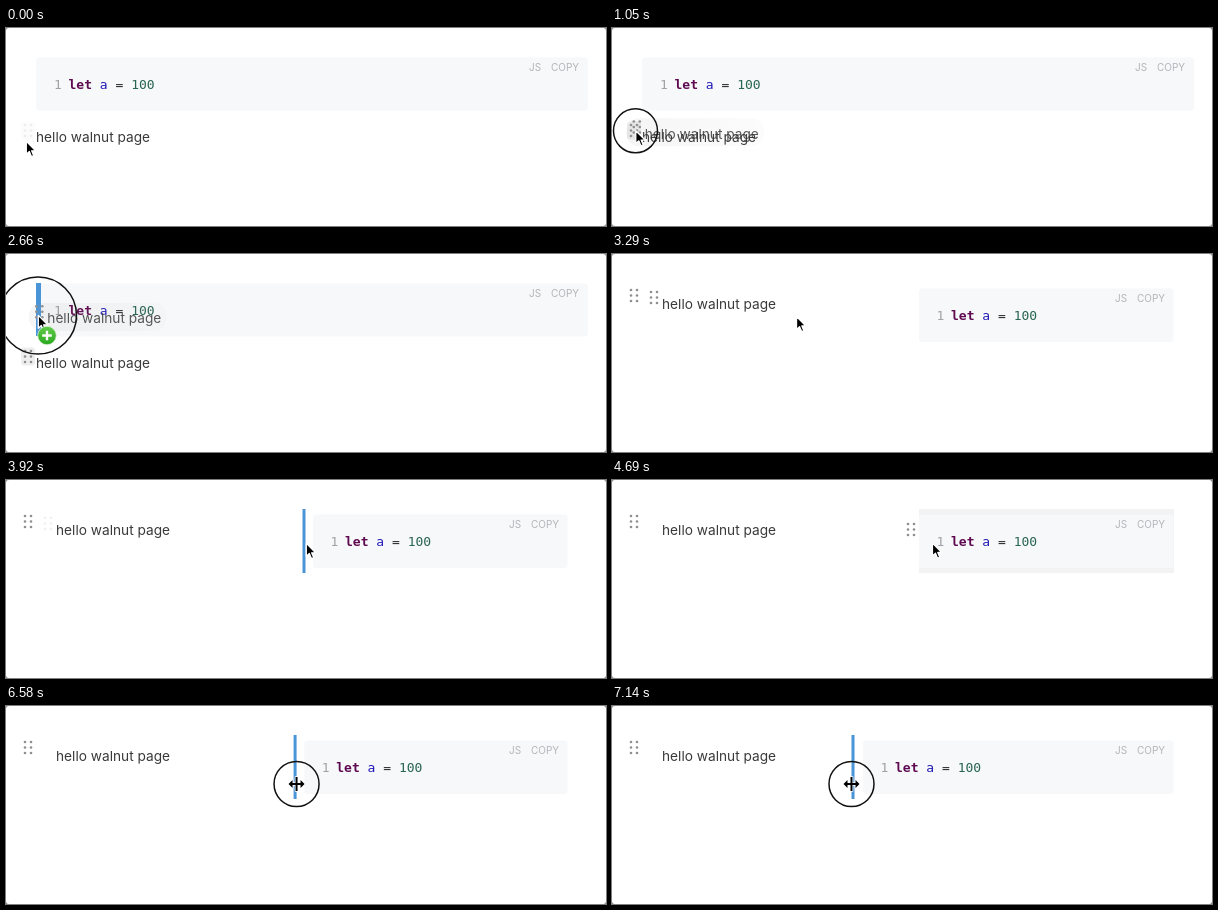
Animation of 600 by 198 pixels, one loop 7210 ms. Source, as an HTML page:

```html
<!DOCTYPE html>
<html lang="en">
<head>
<meta charset="utf-8">
<title>Drag blocks into columns</title>
<style>
  html, body { margin: 0; width: 100%; height: 100%; overflow: hidden; background: #fff; }
  svg { display: block; width: 100vw; height: 100vh; }
  .note { font: 13.7px Inter, Roboto, sans-serif; fill: #3a3a3a; }
  .code { font: 13px "DejaVu Sans Mono", "Noto Sans Mono", monospace; fill: #2a2a2a; white-space: pre; }
  .tag { font: 10px Inter, Roboto, sans-serif; fill: #b3b6ba; }
  .keyword { font-weight: 700; fill: #5f0a50; }
  .name { fill: #2119b4; }
  .number { fill: #2b6650; }
  .line { fill: #a0a3a6; }
</style>
</head>
<body>
<svg viewBox="0 0 600 198" xmlns="http://www.w3.org/2000/svg">
  <defs>
    <g id="dots">
      <circle cx="-3" cy="-5.5" r="1.3"/><circle cx="3" cy="-5.5" r="1.3"/>
      <circle cx="-3" r="1.3"/><circle cx="3" r="1.3"/>
      <circle cx="-3" cy="5.5" r="1.3"/><circle cx="3" cy="5.5" r="1.3"/>
    </g>
    <linearGradient id="fade">
      <stop offset="0" stop-color="#999" stop-opacity=".1"/>
      <stop offset="1" stop-color="#999" stop-opacity=".03"/>
    </linearGradient>
    <linearGradient id="green" x2="0" y2="1">
      <stop offset="0" stop-color="#62cc4c"/>
      <stop offset="1" stop-color="#2aa81f"/>
    </linearGradient>
  </defs>
  <rect width="600" height="198" fill="#8a8a8a"/>
  <rect width="600" height="198" rx="3" fill="#fff"/>

  <rect id="hover" y="29" height="64" fill="#f3f3f4"/>
  <rect id="block" fill="#f6f8fa"/>
  <rect id="bar" fill="#4a94d8"/>
  <g id="code" class="code">
    <text class="line">1</text>
    <text x="14.5"><tspan class="keyword">let</tspan> <tspan class="name">a</tspan> = <tspan class="number">100</tspan></text>
  </g>
  <g id="tags" class="tag"><text>JS</text><text x="22">COPY</text></g>

  <text id="note" class="note">hello walnut page</text>
  <g id="grip">
    <rect id="gripBack" x="-7" y="-9" width="14" height="18" rx="3" fill="#eee"/>
    <use href="#dots" fill="#8f8f8f"/>
  </g>
  <use id="textGrip" href="#dots" x="42" y="43.5" fill="#8f8f8f"/>
  <use id="codeGrip" href="#dots" x="299" y="49.5" fill="#8f8f8f"/>

  <g id="ghost">
    <rect x="-9" y="-12" width="138" height="28" rx="13" fill="url(#fade)"/>
    <use href="#dots" x="1.3" y="-3.3" fill="#8f8f8f"/>
    <text class="note" x="9.3" y="8.4" opacity=".85">hello walnut page</text>
  </g>
  <circle id="ring" fill="none" stroke="#111" stroke-width="1.5"/>
  <g id="arrow">
    <path transform="translate(.3 .4) scale(.92)" d="M0 0V14L3.3 11L5.6 16.4L8 15.4L5.8 10.2H10.2Z" fill="#000" stroke="#fff" stroke-width="1.4" stroke-linejoin="round"/>
    <g id="badge">
      <circle cx="9" cy="20.5" r="9.3" fill="url(#green)" stroke="#dcefd8" stroke-width=".8"/>
      <path d="M9 15.7V25.3M4.2 20.5H13.8" stroke="#fff" stroke-width="2.4"/>
    </g>
  </g>
  <g id="resize">
    <path d="M-8 0L-4-4V-1H-1V-7H1V-1H4V-4L8 0L4 4V1H1V7H-1V1H-4V4Z" fill="#000" stroke="#fff" stroke-width="1.6" stroke-linejoin="round" paint-order="stroke"/>
  </g>
</svg>
<script>
const LOOP = 7210, STEP = 70;
const ui = {};
document.querySelectorAll("svg [id]").forEach(el => ui[el.id] = el);

const set = (el, attrs) => { for (const k in attrs) el.setAttribute(k, attrs[k]); };
const move = (el, x, y) => set(el, { transform: `translate(${x} ${y})` });
const show = (el, amount) => set(el, { opacity: +amount });
const clamp = v => Math.min(1, Math.max(0, v));
const ramp = (t, from, to) => clamp((t - from) / (to - from));
const within = (t, from, to) => t >= from && t < to;
const smooth = p => p * p * (3 - 2 * p);
const fadeBetween = (t, a, b, c, d) => ramp(t, a, b) * (1 - ramp(t, c, d));

// Pointer stops: time, x, y
const stops = [
  [0, 20, 113], [210, 20, 113], [560, 23, 106], [910, 23, 106],
  [1680, 28.5, 63.5], [1750, 29, 63], [2170, 29, 63], [2590, 32, 61],
  [2870, 32, 61], [3640, 300, 63], [4410, 300, 63], [5180, 367, 62],
  [5250, 357, 64], [5530, 311, 72], [5950, 300, 74], [6090, 300, 78],
  [6440, 300, 78], [7000, 239.5, 78], [LOOP, 239.5, 78]
];

function pointer(t) {
  const i = Math.max(1, stops.findIndex(s => s[0] > t));
  const [t0, x0, y0] = stops[i - 1], [t1, x1, y1] = stops[i];
  const p = smooth(ramp(t, t0, t1));
  return [x0 + (x1 - x0) * p, y0 + (y1 - y0) * p];
}

function ringRadius(t) {
  if (within(t, 770, 980)) return 31;
  if (within(t, 980, 2590)) return 22;
  if (within(t, 2590, 2730)) return t < 2660 ? 30 : 38.5;
  return t >= 6510 ? 22.5 : 0;
}

function drawStack(t) {
  set(ui.block, { x: 30, y: 29.5, width: 552, height: 53, rx: 4 });
  set(ui.bar, { x: 30, y: 29, width: 5, height: 53 });
  show(ui.bar, t < 1750 ? 0 : 0.38 + 0.62 * ramp(t, 1750, 1890));
  move(ui.code, 48, 61);
  move(ui.tags, 523, 43);
  move(ui.note, 30, 113.7);
  move(ui.grip, 22, 102.5);
  show(ui.grip, t < STEP ? 0.15 : ramp(t, 210, 560));
  show(ui.gripBack, 1);
  show(ui.hover, 0);
  show(ui.textGrip, 0);
  show(ui.codeGrip, 0);
}

function drawColumns(t, x) {
  const shift = t >= 6440 ? x - 300 : 0;
  const left = 307 + shift * 56 / 60.5;
  const hover = fadeBetween(t, 4480, 4690, 5600, 5950);
  set(ui.block, { x: left, y: 34.5, width: 561.5 - left, height: 53.5, rx: 3 });
  set(ui.hover, { x: left, width: 562 - left });
  show(ui.hover, hover);
  set(ui.bar, { x: 296.5 + shift * 57 / 60.5, y: 29, width: 3, height: 64 });
  show(ui.bar, fadeBetween(t, 3640, 3850, 4200, 4410) + ramp(t, 5600, 5950));
  move(ui.code, left + 17.5, 66);
  move(ui.tags, 503, 48);
  move(ui.note, 50, 54.7);
  move(ui.grip, 22, 41.5);
  show(ui.grip, 1);
  show(ui.gripBack, 0);
  show(ui.textGrip, t < 4480 ? 0.12 + 0.88 * (1 - ramp(t, 3430, 3850)) : 0);
  show(ui.codeGrip, hover);
}

function draw(t) {
  const [x, y] = pointer(t);
  if (t < 2940) drawStack(t); else drawColumns(t, x);

  move(ui.ghost, x, y);
  show(ui.ghost, within(t, 980, 2800));

  const r = ringRadius(t);
  const centred = t >= 6090;
  set(ui.ring, { cx: x, cy: centred ? y : y + 0.5, r });
  show(ui.ring, r > 0);

  move(ui.arrow, x, y);
  show(ui.arrow, !centred);
  show(ui.badge, within(t, 2240, 2800));
  move(ui.resize, x, y);
  show(ui.resize, centred);
}

function frame(now) {
  const t = now % LOOP;
  draw(Math.floor(t / STEP) * STEP);
  requestAnimationFrame(frame);
}
draw(0);
requestAnimationFrame(frame);
</script>
</body>
</html>
```
